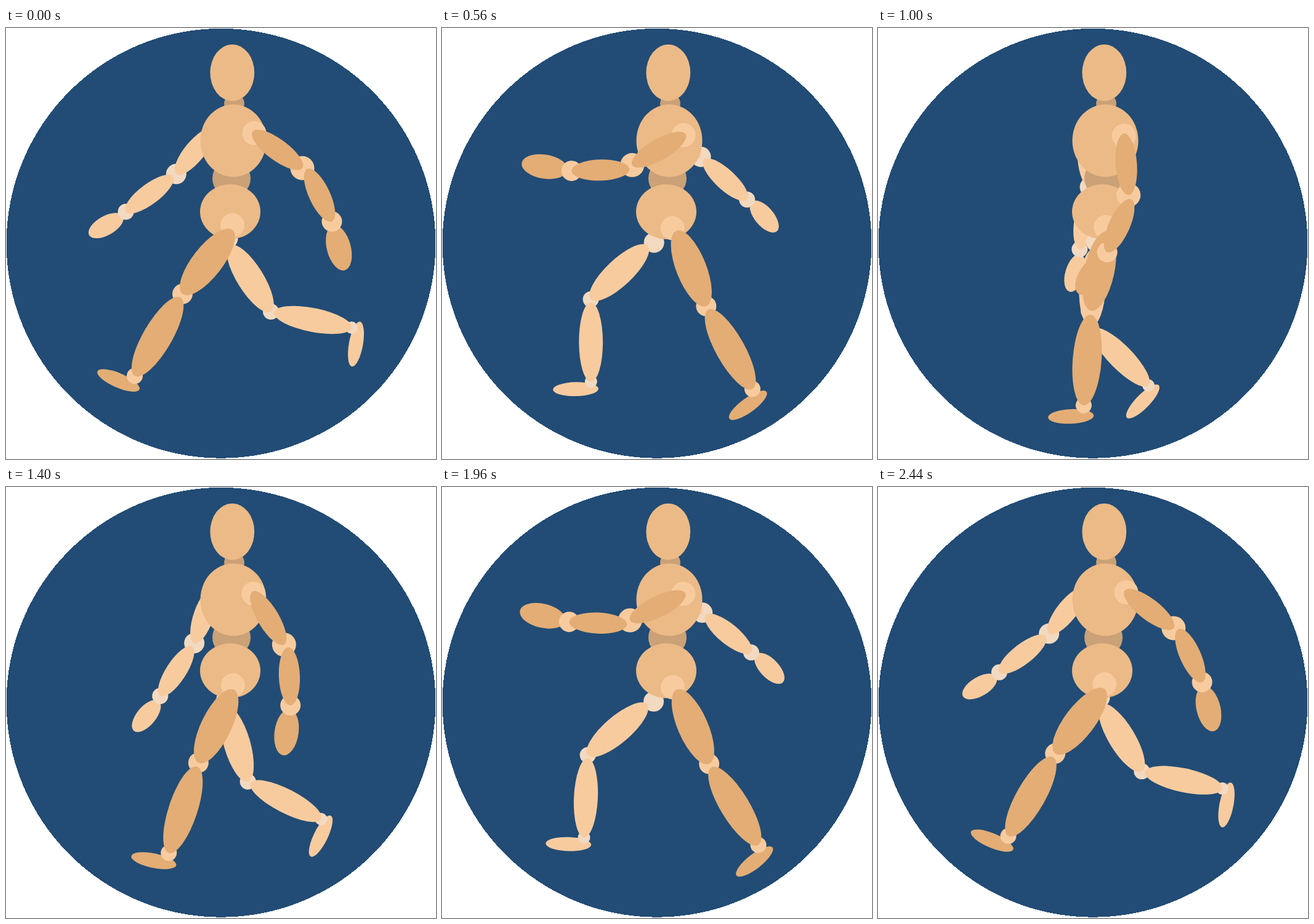
Recreate the animation shown at these times as an HTML page. Size 698x699 px, loop 2480 ms.

```html
<!DOCTYPE html>
<html lang="en">
<head>
<meta charset="utf-8">
<title>Running mannequin</title>
<style>
  html, body { margin: 0; width: 100%; height: 100%; overflow: hidden; background: #fff; }
  svg { display: block; width: 100%; height: 100%; }
</style>
</head>
<body>
<svg id="stage" viewBox="0 0 698 699"></svg>
<script>
const NS = 'http://www.w3.org/2000/svg';
const NAVY = '#224c75', WOOD = '#ecba86', DARK = '#e3ad75',
      LIGHT = '#f8cb9f', PALE = '#f2d9c1', SHADE = '#cba177';

const stage = document.getElementById('stage');

function add(parent, tag, attrs) {
  const el = document.createElementNS(NS, tag);
  for (const key in attrs) el.setAttribute(key, attrs[key]);
  return parent.appendChild(el);
}

function oval(parent, fill, cx, cy, rx, ry = rx, deg = 0) {
  return add(parent, 'ellipse', { cx, cy, rx, ry, fill, transform: `rotate(${deg} ${cx} ${cy})` });
}

// A bone runs from just outside one joint to the next point of the chain.
function bone(parent, fill, from, to) {
  const dx = to.x - from.x, dy = to.y - from.y;
  const gap = 0.4 * from.r / Math.hypot(dx, dy);
  const x = from.x + dx * gap, y = from.y + dy * gap;
  const length = Math.hypot(to.x - x, to.y - y);
  const deg = Math.atan2(dy, dx) * 180 / Math.PI;
  oval(parent, fill, (x + to.x) / 2, (y + to.y) / 2, length / 2, from.w, deg);
}

// Chain points are [x, y, joint radius, half width of the bone that follows].
// The whole limb is rigid and swings around its pivot.
function limb(pivot, swing, boneFill, jointFill, chain) {
  const node = add(stage, 'g', {});
  const points = chain.map(([x, y, r = 0, w = 0]) => ({ x, y, r, w }));
  const bones = points.slice(0, -1)
    .map((from, i) => [from, points[i + 1]])
    .filter(([from]) => from.w);
  const [tip, ...rest] = bones.reverse();

  bone(node, boneFill, ...tip);
  for (const { x, y, r } of points) if (r) oval(node, jointFill, x, y, r);
  for (const ends of rest) bone(node, boneFill, ...ends);
  return { node, pivot, swing };
}

oval(stage, NAVY, 349, 349.3, 348.4).setAttribute('shape-rendering', 'crispEdges');

const backArm = limb([336.6, 163.1], -115, LIGHT, PALE, [
  [336, 163.8, 0, 16.5],
  [276.3, 236.8, 16.5, 16.5],
  [194.5, 298, 13],
  [189.7, 304.9, 0, 15.5],
  [134.9, 336.1]
]);

const backLeg = limb([348, 335], 90, LIGHT, PALE, [
  [360, 341.3, 16.5],
  [363, 352.4, 0, 21.5],
  [430, 460, 13, 19.4],
  [561, 486, 10],
  [574.6, 476.3, 0, 11.4],
  [561.5, 549]
]);

oval(stage, SHADE, 366, 244, 31);
oval(stage, SHADE, 370.5, 122.5, 16.4);
oval(stage, WOOD, 367.3, 72.5, 35.9, 45.8);
oval(stage, WOOD, 369, 182.7, 53.5, 58.8);
oval(stage, WOOD, 364, 298, 49, 44.4);

const frontLeg = limb([375, 316.5], -68, DARK, LIGHT, [
  [367.5, 320, 19.5],
  [367.4, 327.5, 0, 24.5],
  [286.5, 431.3, 16.5, 23.4],
  [209, 564.3, 13],
  [216.6, 586.3, 0, 11.8],
  [148.4, 556.7]
]);

const frontArm = limb([396.5, 168.5], 130, DARK, LIGHT, [
  [403, 170.5, 19.5],
  [400.4, 168, 0, 17.3],
  [481, 227.3, 19.5],
  [489, 228.6, 0, 17.1],
  [529, 313.8, 16.5, 19.5],
  [549.8, 393]
]);

const limbs = [backArm, backLeg, frontLeg, frontArm];

const LOOP = 2480, STEP = 40, HOLD = 160, SWINGS = 4;

// Four half strides per loop, starting brisk and slowing down a little.
function stride(ms) {
  const t = Math.max(HOLD, Math.floor(ms / STEP) * STEP);
  const x = (t - HOLD) / (LOOP - HOLD);
  const phase = SWINGS * (x + 0.139 * x * (1 - x));
  return (1 - Math.cos(Math.PI * phase)) / 2;
}

function draw(ms) {
  const p = stride(ms);
  for (const { node, pivot, swing } of limbs) {
    node.setAttribute('transform', `rotate(${swing * p} ${pivot})`);
  }
}

const start = performance.now();
function tick() {
  draw((performance.now() - start) % LOOP);
  requestAnimationFrame(tick);
}
tick();
</script>
</body>
</html>
```
